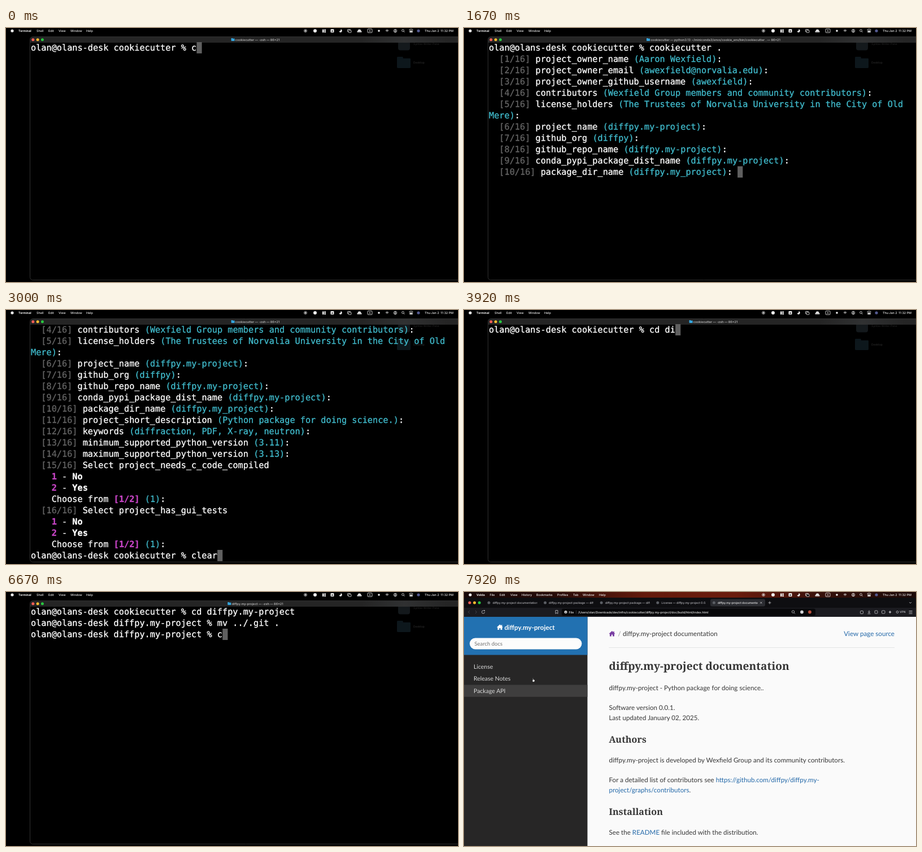
Write an HTML page with a canvas that moves like this. It is 800 px wide and 450 px high and loops after 8000 ms.

```html
<!DOCTYPE html>
<html lang="en">
<head>
<meta charset="utf-8">
<title>Terminal session</title>
<style>
  html, body { margin: 0; width: 100%; height: 100%; overflow: hidden; background: #000; }
  canvas { display: block; width: 800px; height: 450px; }
</style>
</head>
<body>
<canvas id="stage" width="800" height="450"></canvas>
<script>
const ctx = document.getElementById('stage').getContext('2d');
ctx.textRendering = 'geometricPrecision';
ctx.lineJoin = 'round';
const LOOP = 8000, TICKS_PER_MS = 12 / 1000;
const MONO = '"DejaVu Sans Mono", monospace';
const UI = 'Inter, sans-serif';
const BODY = 'Lato, sans-serif';
const SLAB = '"Noto Serif", serif';
const COL = 9.17, ROW = 20, ROWS = 21;

// ---------- drawing helpers ----------
function rect(x, y, w, h, fill) {
  ctx.fillStyle = fill;
  ctx.fillRect(x, y, w, h);
}
function round(x, y, w, h, r, fill, stroke) {
  ctx.beginPath();
  ctx.roundRect(x, y, w, h, r);
  if (fill) { ctx.fillStyle = fill; ctx.fill(); }
  if (stroke) { ctx.strokeStyle = stroke; ctx.stroke(); }
}
function dot(x, y, r, fill, stroke) {
  ctx.beginPath();
  ctx.arc(x, y, r, 0, Math.PI * 2);
  if (fill) { ctx.fillStyle = fill; ctx.fill(); }
  if (stroke) { ctx.strokeStyle = stroke; ctx.stroke(); }
}
function path(points, fill, stroke, x = 0, y = 0) {
  ctx.beginPath();
  points.forEach(([px, py]) => ctx.lineTo(x + px, y + py));
  if (fill) { ctx.fillStyle = fill; ctx.closePath(); ctx.fill(); }
  if (stroke) { ctx.strokeStyle = stroke; ctx.stroke(); }
}
function text(str, x, y, font, fill, align = 'left') {
  ctx.font = font;
  ctx.fillStyle = fill;
  ctx.textAlign = align;
  ctx.fillText(str, x, y);
}
function lights(x, y, gap, colors) {
  colors.forEach((c, i) => dot(x + i * gap, y, 2.5, c));
}
function folder(x, y, w, h, fill) {
  round(x, y, w * 0.45, h * 0.5, w * 0.06, fill);
  round(x, y + h * 0.14, w, h * 0.86, w * 0.06, fill);
}

// ---------- terminal content ----------
// Style marks: §w white, §d dim, §c cyan, §m magenta bold, §b white bold, §g green
const STYLES = {
  w: ['#fff', ''], d: ['#646464', ''], c: ['#41bccd', ''],
  m: ['#c845c6', 'bold '], b: ['#fff', 'bold '], g: ['#35ab45', '']
};
const HOME = 'olan@olans-desk cookiecutter % ';
const PROJECT = 'olan@olans-desk diffpy.my-project % ';
const DOC = 'olan@olans-desk doc % ';
const RUN = HOME + 'cookiecutter .';

const field = (n, name, value) => `  §d[${n}/16]§w ${name} §c(${value})§w: `;
const choice = (n, name) => [
  `  §d[${n}/16]§w Select ${name}`,
  '    §m1§w - §bNo', '    §m2§w - §bYes',
  '    Choose from §m[1/2]§c (1)§w: '
];
const questions = [
  ['project_owner_name', 'Aaron Wexfield'],
  ['project_owner_email', 'awexfield@norvalia.edu'],
  ['project_owner_github_username', 'awexfield'],
  ['contributors', 'Wexfield Group members and community contributors'],
  ['license_holders', 'The Trustees of Norvalia University in the City of Old\n§cMere'],
  ['project_name', 'diffpy.my-project'],
  ['github_org', 'diffpy'],
  ['github_repo_name', 'diffpy.my-project'],
  ['conda_pypi_package_dist_name', 'diffpy.my-project'],
  ['package_dir_name', 'diffpy.my_project'],
  ['project_short_description', 'Python package for doing science.'],
  ['keywords', 'diffraction, PDF, X-ray, neutron'],
  ['minimum_supported_python_version', '3.11'],
  ['maximum_supported_python_version', '3.13']
].map(([name, value], i) => field(i + 1, name, value).split('\n'));
questions.push(choice(15, 'project_needs_c_code_compiled'), choice(16, 'project_has_gui_tests'));
const asked = n => [RUN, ...questions.slice(0, n).flat()];

const WRITING = 'Writing evaluated template result to /Users/olan/Downloads/dev/infra/cookiecutter/diff';
const STATIC = 'py.my-project/doc/build/html/_static/';
const buildLog = [
  STATIC + 'language_data.js', WRITING,
  STATIC + 'documentation_options.js', WRITING,
  STATIC + 'js/versions.js',
  '§bcopying static files: §wdone',
  '§bcopying extra files...',
  '§bcopying extra files: §wdone',
  '§bcopying assets: §wdone',
  '§bwriting output... §w[100%] §grelease',
  '§bgenerating indices... §wgenindex done',
  '§bhighlighting module code...',
  '§bwriting additional pages... §wsearch done',
  '§bdumping search index in English (code: en)... §wdone',
  '§bdumping object inventory... §wdone',
  '§bbuild succeeded, 5 warnings.',
  '', 'The HTML pages are in build/html.',
  '', 'Build finished. The HTML pages are in build/html.', ''
];

// ---------- timeline, in ticks of 1/12 s ----------
const cues = [];
const title = (dir, job) => `${dir} — ${job} — 86×21`;
const T_HOME = title('cookiecutter', '-zsh');
const T_RUN = title('cookiecutter', 'python3.13 ~/miniconda3/envs/cookie_env/bin/cookiecutter .');
const T_PROJECT = title('diffpy.my-project', '-zsh');
const T_MAKE = title('diffpy.my-project', 'python3.13 · make html');

function cue(tick, lines, name) { cues.push({ tick, lines, name }); }
// steps: [tick, number of characters typed so far]
function type(before, prompt, command, name, steps) {
  for (const [tick, n] of steps) cue(tick, [...before, prompt + command.slice(0, n)], name);
}

type([], HOME, 'cookiecutter .', T_HOME,
  [[0, 1], [1, 2], [2, 3], [3, 4], [4, 5], [6, 7], [7, 10], [8, 12], [9, 14]]);
cue(10, [RUN, ''], T_RUN);
[1, 2, 3, 4, 5, 6, 7, 9, 10, 11, 12, 13, 14, 15, 16].forEach((n, i) => cue(12 + i, asked(n), T_RUN));
cue(27, [...asked(16), ''], T_RUN);
type(asked(16), HOME, 'clear', T_HOME, [[30, 0], [31, 1], [32, 2], [33, 3], [34, 4], [35, 5]]);
type([], HOME, 'cd diffpy.my-project/', T_HOME,
  [[40, 0], [43, 1], [44, 2], [45, 3], [46, 4], [47, 5], [48, 6], [50, 21]]);
const entered = [HOME + 'cd diffpy.my-project'];
type(entered, PROJECT, 'mv ../.git .', T_PROJECT,
  [[53, 0], [61, 1], [62, 2], [63, 3], [69, 4], [70, 5], [71, 6], [73, 7], [75, 9], [76, 10], [77, 11], [78, 12]]);
const moved = [...entered, PROJECT + 'mv ../.git .'];
type(moved, PROJECT, 'cd doc', T_PROJECT, [[79, 0], [80, 1], [81, 2], [82, 6]]);
const inDoc = [...moved, PROJECT + 'cd doc'];
type(inDoc, DOC, 'make html', T_PROJECT, [[83, 0], [86, 1], [87, 4], [88, 9]]);
cue(89, [...inDoc, DOC + 'make html', ''], T_MAKE);
cue(90, buildLog, T_MAKE);
const BLUR_TICK = 91, BROWSER_TICK = 93;

// ---------- menu bar ----------
const TERMINAL_MENU = [['Terminal', 22], ['Shell', 54], ['Edit', 75], ['View', 93], ['Window', 114], ['Help', 142]];
const BROWSER_MENU = [['Velda', 22], ['File', 45.5], ['Edit', 63], ['View', 82], ['History', 102],
  ['Bookmarks', 128], ['Profiles', 165], ['Tab', 193], ['Window', 210], ['Help', 239]];

function menuBar(items) {
  const w = '#eee';
  ctx.lineWidth = 0.8;
  dot(11, 5, 2.6, w);
  items.forEach(([label, x], i) => text(label, x, 7, `${i ? 500 : 700} 5.35px ${UI}`, w));
  dot(530, 5, 2.4, null, w);
  dot(530, 5, 1.2, w);
  dot(547, 5, 3, w);
  rect(560, 2.5, 2.5, 5.5, w);
  rect(563.3, 2.5, 2.7, 2.4, w);
  rect(563.3, 5.6, 2.7, 2.4, w);
  round(574.5, 2, 6, 6, 1, w);
  path([[576, 6.5], [577.5, 3.5], [579, 6.5]], '#111');
  ctx.beginPath();
  ctx.arc(592, 5, 2.7, -1.4, 2.9, false);
  ctx.quadraticCurveTo(592.5, 6, 592.5, 2.4);
  ctx.fillStyle = w;
  ctx.fill();
  round(604.5, 2.5, 5, 4, 0.6, null, w);
  round(606, 4, 5, 4, 0.6, '#000', w);
  ctx.beginPath();
  ctx.arc(625.5, 5.5, 3, Math.PI, 0);
  ctx.fillStyle = w;
  ctx.fill();
  rect(621.5, 5.5, 8, 2, w);
  round(640, 1.8, 8, 6.4, 1, null, w);
  text('A', 644, 7, `5px ${UI}`, w, 'center');
  dot(660, 5, 1.8, w);
  [1.4, 2.8, 4].forEach(r => {
    ctx.beginPath();
    ctx.arc(674.5, 7.4, r, -2.3, -0.84);
    ctx.strokeStyle = w;
    ctx.stroke();
  });
  dot(689, 5, 2.7, null, w);
  dot(689, 4.3, 1, w);
  rect(687.6, 5.8, 2.8, 1, w);
  dot(702.5, 4.5, 1.9, null, w);
  path([[704, 6], [705.5, 7.5]], null, w);
  round(714, 2.2, 6, 2.4, 1.2, null, w);
  round(714, 5.4, 6, 2.4, 1.2, w);
  dot(730, 5, 2.6, '#53598f');
  text('Thu Jan 2  11:32 PM', 792, 7, `500 5.4px ${UI}`, w, 'right');
}

// ---------- terminal window ----------
// A hairline outline gives the slightly heavy look of smoothed screen type.
function termLine(line, x, y) {
  let col = 0;
  ctx.lineWidth = 0.3;
  for (const part of ('§w' + line).split('§').slice(1)) {
    const [color, weight] = STYLES[part[0]], str = part.slice(1), left = x + col * COL;
    text(str, left, y, `${weight}15.23px ${MONO}`, color);
    ctx.strokeStyle = color;
    ctx.strokeText(str, left, y);
    col += str.length;
  }
  return col;
}

function terminal({ lines, name }, active) {
  const left = active ? 42.5 : 41.5, textX = active ? 44 : 43;
  rect(0, 0, 800, 450, '#000');
  const base = active ? '#252525' : '#181818', glow = active ? '#303132' : '#222324';
  const bar = ctx.createLinearGradient(630, 0, 780, 0);
  [base, glow, base].forEach((c, i) => bar.addColorStop(i / 2, c));
  ctx.lineWidth = 1;
  round(left, 15.5, 820, 431, 5, '#000', '#303030');
  round(694, 19, 21, 20.5, 4, '#14191c');
  folder(692, 51, 24, 20, '#0d171c');
  text('Syntax Writer Pane', 721, 30, `500 5px ${UI}`, '#222');
  text('Desktop', 721, 63, `500 5px ${UI}`, '#2a2a2a');
  round(left + 0.5, 16, 820, 10, [4, 4, 0, 0], bar);

  lights(active ? 47.8 : 46.6, 20.7, 8.3, active ? ['#ff5f57', '#febc2e', '#28c840'] : ['#3a3a3a', '#3a3a3a', '#3a3a3a']);
  ctx.font = `600 5.5px ${UI}`;
  const half = ctx.measureText(name).width / 2;
  folder(438 - half, 18, 6, 5, active ? '#35a5dc' : '#1d4a60');
  text(name, 445, 22.6, ctx.font, active ? '#b4b4b4' : '#666', 'center');

  const shown = lines.slice(-ROWS), last = shown.length - 1;
  let end = 0;
  shown.forEach((line, i) => { end = termLine(line, textX, 40.3 + i * ROW); });
  const cx = textX + end * COL, cy = 25 + last * ROW;
  if (active) rect(cx, cy, 9.2, ROW, '#5f5f5f');
  else {
    ctx.lineWidth = 1;
    ctx.strokeStyle = '#666';
    ctx.strokeRect(43.5, cy + 0.5, 8, 19);
  }
}

// ---------- browser window ----------
const ICON = '#c8c8cc';
const TABS = ['diffpy.my-project documentation', 'diffpy.my-project package — diffpy',
  'diffpy.my-project package — diffpy', 'License — diffpy.my-project 0.0.1', 'diffpy.my-project documentation'];

function clipped(str, x, y, width, font, fill) {
  ctx.save();
  ctx.beginPath();
  ctx.rect(x, y - 10, width, 14);
  ctx.clip();
  text(str, x, y, font, fill);
  ctx.restore();
}

function browserChrome() {
  const wall = ctx.createLinearGradient(0, 0, 800, 0);
  ['#170808', '#260b08', '#641a0c', '#6b1c0d', '#35100a', '#1b0908'].forEach((c, i) => wall.addColorStop(i / 5, c));
  rect(0, 0, 800, 12, wall);
  round(0, 10, 800, 34, [4, 4, 0, 0], '#0e0e11');
  lights(10, 19, 8.6, ['#ff5f57', '#febc2e', '#28c840']);
  round(436, 12.5, 97, 13, 3, '#2b2c31');
  TABS.forEach((label, i) => {
    const x = 44 + i * 99.6, on = i === 4;
    dot(x, 19, 2.5, '#5b5e64');
    clipped(label, x + 6.5, 21, on ? 71 : 79, `500 5.1px ${UI}`, on ? '#eee' : '#b5b5ba');
  });
  ctx.lineWidth = 0.8;
  path([[524.3, 17.5], [527.3, 20.5]], null, ICON);
  path([[527.3, 17.5], [524.3, 20.5]], null, ICON);
  path([[538.5, 19], [543.5, 19]], null, ICON);
  path([[541, 16.5], [541, 21.5]], null, ICON);
  path([[788, 18], [790, 20], [792, 18]], null, ICON);

  rect(0, 28, 800, 16, '#1b1b20');
  path([[10, 33], [7.5, 35.5], [10, 38]], null, '#55555b');
  path([[20, 33], [22.5, 35.5], [20, 38]], null, '#55555b');
  ctx.beginPath();
  ctx.arc(34, 35.5, 2.6, 0, 5.2);
  ctx.strokeStyle = ICON;
  ctx.stroke();
  path([[34.7, 32.2], [37, 34.6], [37, 32]], ICON);
  path([[162, 32.5], [166, 32.5], [166, 38.5], [164, 36.8], [162, 38.5], [162, 32.5]], null, ICON);
  round(173, 29.5, 449, 12.5, 3, '#08080a');
  dot(180, 35.5, 2.5, '#ddd');
  rect(179.6, 34.8, 0.9, 2.2, '#08080a');
  text('File', 185.5, 37.5, `500 5.3px ${UI}`, '#eee');
  rect(198, 32.5, 0.7, 6, '#444');
  text('/Users/olan/Downloads/dev/infra/cookiecutter/diffpy.my-project/doc/build/html/index.html',
    202, 37.5, `500 5.3px ${UI}`, '#e6e6e6');
  dot(582.5, 35, 2.2, null, ICON);
  path([[584, 36.6], [586, 38.6]], null, ICON);
  dot(598, 35.5, 2.9, '#d5d5d8');
  dot(612, 35.5, 2.9, '#b8503c');
  round(701.5, 33.5, 5, 5, 1, null, ICON);
  path([[717, 32.5], [717, 36.5]], null, ICON);
  path([[715, 35], [717, 37], [719, 35]], null, ICON);
  path([[714.5, 38.6], [719.5, 38.6]], null, ICON);
  round(727, 33, 5, 5, 1, null, ICON);
  round(739.5, 33, 5.5, 5, 1, null, ICON);
  path([[754, 32.5], [755, 35], [757, 35.5], [755, 36.2], [754, 38.5], [753, 36.2], [751, 35.5], [753, 35]], ICON);
  dot(767, 35.5, 1.9, null, ICON);
  text('VPN', 771, 37.4, `500 5px ${UI}`, ICON);
  [33.2, 35.5, 37.8].forEach(y => rect(787.5, y, 6, 0.8, ICON));
}

const HOUSE = [[0, 5], [5.5, 0], [8, 2.2], [8, 0.8], [9.4, 0.8], [9.4, 3.4], [11, 5], [9.5, 5.2], [9.5, 9.5],
  [6.6, 9.5], [6.6, 6.4], [4.4, 6.4], [4.4, 9.5], [1.5, 9.5], [1.5, 5.2]];

function page() {
  const p = `11.65px ${BODY}`, ink = '#363636', link = '#2469a9', x = 256.5;
  rect(0, 44, 800, 406, '#fafafa');
  rect(0, 44, 218.5, 406, '#272626');
  rect(0, 44, 218.5, 67.5, '#2271b1');
  path(HOUSE, '#fff', null, 58, 57.5);
  text('diffpy.my-project', 71.5, 66.5, `bold 11.65px ${BODY}`, '#fff');
  round(10, 81.5, 198.5, 20, 10, '#fcfcfc');
  text('Search docs', 18.5, 95, `9.46px ${BODY}`, '#707070');
  rect(0, 164.5, 218.5, 21.3, '#3f3e3e');
  ['License', 'Release Notes', 'Package API'].forEach((item, i) =>
    text(item, 17, 135.8 + i * 21.4, `10.5px ${BODY}`, '#dadada'));

  path(HOUSE, '#7a3fa3', null, x, 69);
  text('/', 272.5, 78, p, '#999');
  text('diffpy.my-project documentation', 281, 78, p, ink);
  text('View page source', 762, 78, p, link, 'right');
  rect(x, 98, 505.5, 0.8, '#dcdfe0');
  text('diffpy.my-project documentation', x, 138, `bold 19.2px ${SLAB}`, ink);
  text('diffpy.my-project - Python package for doing science..', x, 174, p, ink);
  text('Software version 0.0.1.', x, 209, p, ink);
  text('Last updated January 02, 2025.', x, 226.5, p, ink);
  text('Authors', x, 266.5, `bold 16.2px ${SLAB}`, ink);
  text('diffpy.my-project is developed by Wexfield Group and its community contributors.', x, 302, p, ink);
  runs(x, 337, p, ['For a detailed list of contributors see ', ink], ['https://github.com/diffpy/diffpy.my-', link]);
  runs(x, 354.5, p, ['project/graphs/contributors', link], ['.', ink]);
  text('Installation', x, 394.5, `bold 16.2px ${SLAB}`, ink);
  runs(x, 430, p, ['See the ', ink], ['README', link], [' file included with the distribution.', ink]);
}
function runs(x, y, font, ...parts) {
  for (const [str, color] of parts) {
    text(str, x, y, font, color);
    x += ctx.measureText(str).width;
  }
}

function hand(x, y) {
  ctx.lineWidth = 0.6;
  path([[-1.5, -3.5], [-0.5, -3.5], [-0.3, -1], [2, -0.5], [2.2, 1.5], [1.3, 3.3], [-1.2, 3.3], [-2.6, 0.8], [-1.5, 0.8], [-1.5, -3.5]],
    '#fff', '#111', x, y);
}
function arrow(x, y) {
  ctx.lineWidth = 0.6;
  path([[0, 0], [0, 6], [1.5, 4.8], [2.6, 7], [3.4, 6.6], [2.4, 4.4], [4.2, 4.2], [0, 0]], '#000', '#999', x, y);
}

// ---------- loop ----------
function draw(time) {
  const tick = Math.floor((time % LOOP + 4) * TICKS_PER_MS) % 96;
  if (tick >= BROWSER_TICK) {
    rect(0, 0, 800, 450, '#000');
    browserChrome();
    page();
    menuBar(BROWSER_MENU);
    const k = (tick - 92) / 3;
    hand(243 - 120 * k, 251 - 95 * k);
  } else {
    const active = tick < BLUR_TICK;
    terminal(cues.findLast(c => c.tick <= tick), active);
    menuBar(active ? TERMINAL_MENU : BROWSER_MENU);
    if (!active) arrow(242, 249);
  }
}

const start = performance.now();
function frame() {
  draw(performance.now() - start);
  requestAnimationFrame(frame);
}
frame();
</script>
</body>
</html>
```
